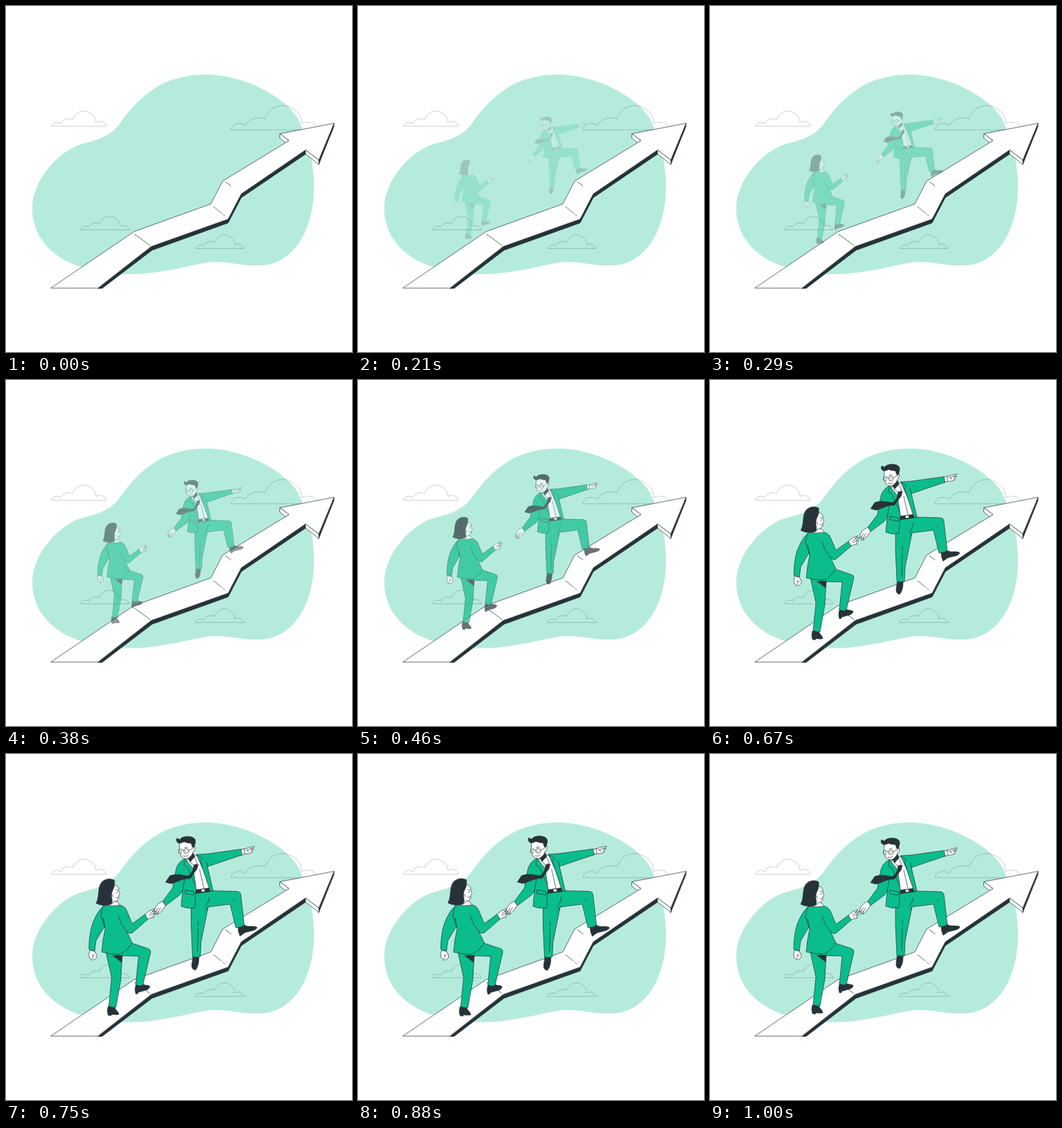
An HTML page for the animation above (1040 ms loop, 500x500 px).

```html
<!DOCTYPE html>
<html lang="en">
<head>
<meta charset="utf-8">
<title>Climbing together</title>
<style>
  html, body { margin: 0; width: 100%; height: 100%; overflow: hidden; background: #fff; }
  svg { display: block; width: 100%; height: 100%; }
  path, circle { stroke-linejoin: round; stroke-linecap: round; }
  .ink { stroke: #263238; stroke-width: .7; }
  .green { fill: #0abd8c; }
  .white { fill: #fff; }
  .dark { fill: #263238; }
  .line { fill: none; }
  .cloud { fill: none; stroke: #263238; stroke-opacity: .34; stroke-width: .7; }
  .cloud path { vector-effect: non-scaling-stroke; }
</style>
</head>
<body>
<svg viewBox="0 0 500 500">
  <path fill="#b5ebdd" d="M288 99C345 99 405 133 422 163C438 195 446 235 445 264C444 326 414 377 362 375C340 375 318 369 298 370C268 373 230 387 180 387.5C95 388 38 352 38 292C38 252 75 212 105 201C130 194 148 190 163 172C190 133 225 99 288 99Z"/>
  <g id="clouds" class="cloud"></g>

  <g class="ink" id="arrow">
    <path class="dark" d="M133 408L210 347.5L321 308L340 271.5L433 208V214L340 277L321 313.5L211 353L139 408Z"/>
    <path class="dark" d="M452 222.5L474 169.5V174L452 229Z"/>
    <path class="white" d="M433 208L452 222.5V229L433 214Z"/>
    <path class="white" d="M396 184.5L409 194.5L404 197.5L396 191Z"/>
    <path class="white" d="M65 407.5L185 326L296 286L313 253L409 194.5L396 184.5L474 169.5L452 222.5L433 208L340 271.5L321 308L210 347.5L133 407.5Z"/>
    <path class="line" d="M186 330L208 346M300 290L311 299M313.500 301L316 303M317 254L325 260"/>
  </g>

  <g id="woman" class="ink">
    <!-- legs and shoes -->
    <path class="dark" d="M148 363L157 363C158 368 163 370 163 374C159 375 156 374 153 374L152 376L148 375Q146 369 148 363ZM187 333L197 331C200 334 206 332 207 335C205 340 200 340 197 341L190 343L190 345L187 345Q185 339 187 333Z"/>
    <path class="green" d="M145 286L153 322L149 362Q154 365 159 364L166 325L168 289Z"/>
    <path class="green" d="M160 291L191 292L187 332Q192 335 197 333L208 286Q208 282 204 281L180 273Z"/>
    <path class="dark" d="M155 291L168 291L167 300Z"/>
    <!-- fist and far arm -->
    <path class="white" d="M122 284C120 290 121 295 125 297C129 298 132 295 132 291L129 285Z"/>
    <path class="line" d="M125 296Q128 294 126 290L129 291"/>
    <path class="green" d="M144 220C136 224 131 234 126 246Q121 262 121 282L129 285L131 270L143 250Z"/>
    <!-- reaching hand -->
    <path class="white" d="M200 233L206 228L214 225L210 229L216 228L211 232L215 232L211 235L213 237L208 238L203 240Z"/>
    <path class="line" d="M206 233L211 229M207 235L211 232"/>
    <!-- jacket -->
    <path class="green" d="M141 221Q152 217 165 220Q171 221 174 227L182 246L200 233L204 240L182 259Q177 261 174 256L182 273Q173 286 165 289Q150 289 139 286Q140 270 144 253L138 235Z"/>
    <path class="line" d="M162 234L166 245L174 257M144 253L141 238"/>
    <!-- head -->
    <path class="white" d="M142 220L149 213L161 215L165 220Q154 222 142 220Z"/>
    <path class="white" d="M152 188L158 191L163 195L163 200L165 204L163 206L163 210Q161 215 156 215L154 218L146 217Z"/>
    <path class="dark" d="M157 185C151 181 142 183 138 189C133 196 136 210 131 217Q140 222 152 219C156 214 152 210 153 205C153 199 158 195 157 189Z"/>
    <path class="line" d="M159 198L162 199M160.500 201V203M159 209L162 209M155 205Q153 208 156 208"/>
  </g>

  <g id="man" class="ink">
    <!-- legs and shoes -->
    <path class="dark" d="M271 290L279 290C279 297 279 304 274 310Q268 309 269 302ZM334 249L343 246C347 250 353 247 360 249Q363 251 356 254L344 257L337 262Q334 256 334 249Z"/>
    <path class="green" d="M268 218L268 246L270 291Q275 293 281 291L282 270L292 221L323 217L331 250Q337 250 343 247L338 203Q337 199 332 199L296 198L274 200Z"/>
    <path class="line" d="M278 241V247M278 251L277 284M292 221L289 226M288 221Q293 214 294 207M328 211L330 212"/>
    <!-- shirt and belt -->
    <path class="white" d="M262 153L276 148L283 163L296 196L274 201Z"/>
    <path class="line" d="M280 168L286 194"/>
    <path class="dark" d="M273 197L295 194L296 199L274 202Z"/>
    <path class="white" d="M282 196L287 195.500L288 199L283 200Z"/>
    <!-- pointing arm -->
    <path class="white" d="M338 140L344 139L350 137L357 135.500Q358 137 352 139L356 139Q357 141 353 141L354 144Q349 147 344 146L339 148Z"/>
    <path class="line" d="M343 139V146M352 139L346 141L350 143"/>
    <path class="green" d="M276 147L291 146L338 139.500L340 147.500L291 164Q295 180 299 198L295 199L284 166Z"/>
    <path class="line" d="M276 147L284 153L281 157L284 166M291 164L289 156"/>
    <!-- near arm -->
    <path class="white" d="M228 213C222 215 219 219 217 223L216 229L219 226L218 232L222 227L221 232L226 227L232 219Z"/>
    <path class="line" d="M222 222L219 226M225 222L222 227"/>
    <path class="green" d="M259 153Q250 157 247 167Q244 180 242 194L228 213L232 219L252 204L256 198L254 220Q263 224 273 222L275 195L271 167Z"/>
    <path class="line" d="M256 198Q258 187 259 180M260 197L272 199L272 204L260 202ZM259 153L258 162L263 165L274 190"/>
    <!-- tie -->
    <path class="dark" d="M272 161L278 161L276 168C271 173 270 178 266 181C257 180 248 186 240 188L232 186L238 177C248 173 257 177 264 177Q269 174 271 167Z"/>
    <!-- head -->
    <path class="white" d="M265 153L271 148L277 159L272 162L267 158Z"/>
    <path class="dark" d="M264 153L271 145L273 150L267 157Z"/>
    <path class="white" d="M252 129L251.500 138L250 144L253 146L254 150Q257 153 262 153Q269 150 271 143Q276 138 272 134L266 129Z"/>
    <path class="dark" d="M251 131C248 130 246 127 248 124L252 126C255 121 264 121 268 122Q275 124 274 130L272 137L270 137L268 131Q262 131 258 129Q255 131 251 131Z"/>
    <circle class="line" cx="261" cy="142" r="3.500"/>
    <path class="line" d="M257 142L256 141M256 140Q251 138 251 142Q251 145 255 145M265 141L271 138M259 137L263 137M257 149Q261 151 264 148M260 141V143M254 141V143"/>
  </g>
</svg>
<script>
  const CLOUD = 'M0 0C2-6.5 9-6.5 13-3.5C16-10.5 24-11.5 31-10C34-19 43-23.5 51-21C59-18.5 64-13 64-5.5C71-8.5 77-5.5 79 0Z';
  const places = [[66, 173.5, 1], [108, 323, .886], [274, 350, .886], [325, 178.5, 1.6]];
  document.getElementById('clouds').innerHTML = places.map(([x, y, s]) =>
    `<path d="${CLOUD}" transform="translate(${x} ${y}) scale(${s})"/>`).join('');

  const LOOP = 1040, STEP = 1000 / 24;
  const people = [['woman', 167.5, 279.5], ['man', 288, 216]]
    .map(([id, x, y]) => ({ el: document.getElementById(id), x, y }));

  const bezier = (a, b, u) => 3 * u * (1 - u) * ((1 - u) * a + u * b) + u ** 3;

  // cubic-bezier(.36, -.01, .5, 1.38): overshoots before settling
  function ease(x) {
    let lo = 0, hi = 1;
    for (let i = 0; i < 24; i++) {
      const mid = (lo + hi) / 2;
      if (bezier(.36, .5, mid) < x) lo = mid; else hi = mid;
    }
    return bezier(-.01, 1.38, hi);
  }

  function draw(now) {
    const step = Math.floor((now % LOOP + 3.5) / STEP);
    const p = step < 3 ? 0 : ease(Math.min(1, (step + .5) / 24.5));
    const scale = .5 + .5 * p;
    for (const { el, x, y } of people) {
      el.setAttribute('opacity', Math.min(1, p));
      el.setAttribute('transform', `translate(${x} ${y}) scale(${scale}) translate(${-x} ${-y})`);
    }
  }

  const start = performance.now();
  function tick() {
    draw(performance.now() - start);
    requestAnimationFrame(tick);
  }
  tick();
</script>
</body>
</html>
```
